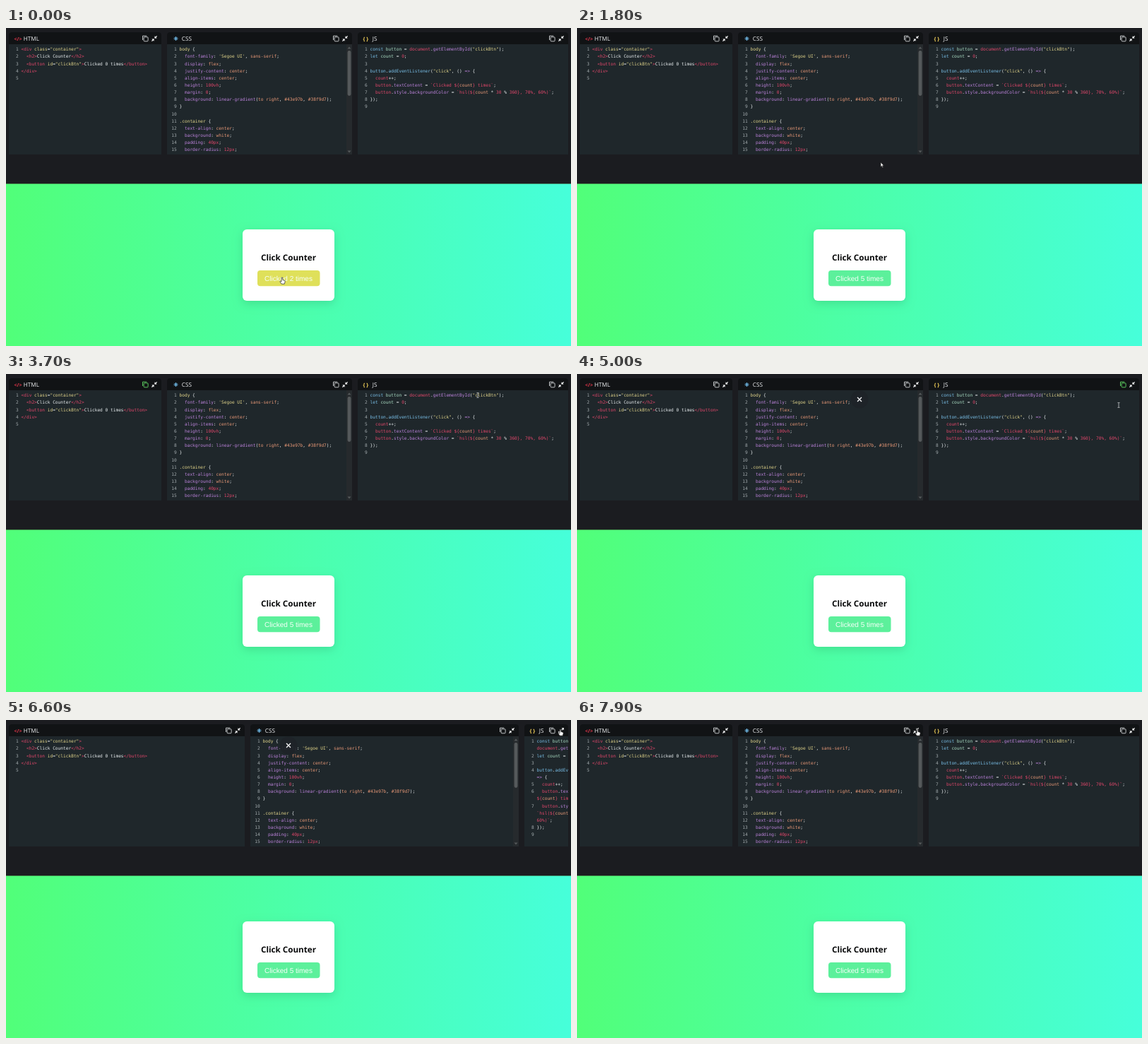
Animation, 800 px wide and 450 px high, one loop 8000 ms. Source, as an HTML page with a canvas:

```html
<!DOCTYPE html>
<html lang="en">
<head>
<meta charset="utf-8">
<title>Click Counter</title>
<style>
html, body { margin: 0; width: 100%; height: 100%; overflow: hidden; background: #1b1c20; }
canvas { display: block; }
</style>
</head>
<body>
<canvas id="stage" width="800" height="450"></canvas>
<script>
const ctx = document.getElementById('stage').getContext('2d');
const LOOP = 8000, CHAR = 3.72, ROW = 10.15, WRAP = 36;
const MONO = '6.18px "DejaVu Sans Mono", monospace';
const SANS = '"Open Sans", "Noto Sans", sans-serif';

// "~k" switches to colour k for the rest of the line.
const INK = {
  w: '#e9eef0', r: '#e2476b', y: '#e3d68b', o: '#eb9a78',
  p: '#bd83dc', b: '#79bfe8', g: '#a9dcc3'
};

const HTML = [
  '~r<div ~yclass~w=~y"container"~r>',
  '  ~r<h2>~wClick Counter~r</h2>',
  '  ~r<button ~yid~w=~y"clickBtn"~r>~wClicked 0 times~r</button>',
  '~r</div>',
  ''
];
const rule = (name, value) => `  ~p${name}~w: ${value}~w;`;
const CSS = [
  '~ybody ~w{',
  rule('font-family', "~y'Segoe UI'~w, ~osans-serif"),
  rule('display', '~oflex'),
  rule('justify-content', '~ocenter'),
  rule('align-items', '~ocenter'),
  rule('height', '~r100vh'),
  rule('margin', '~r0'),
  rule('background', '~plinear-gradient~w(~oto right~w, ~o#43e97b~w, ~o#38f9d7~w)'),
  '~w}',
  '',
  '~y.container ~w{',
  rule('text-align', '~ocenter'),
  rule('background', '~owhite'),
  rule('padding', '~r40px'),
  rule('border-radius', '~r12px')
];
const JS = [
  '~bconst ~gbutton ~w= ~rdocument~w.~pgetElementById~w(~y"clickBtn"~w);',
  '~blet ~gcount ~w= ~r0~w;',
  '',
  '~bbutton~w.~baddEventListener~w(~y"click"~w, () ~p=> ~w{',
  '  ~rcount~w++;',
  '  ~rbutton~w.~ptextContent ~w= ~r`Clicked ${~ocount~r} times`~w;',
  '  ~rbutton~w.~pstyle~w.~pbackgroundColor ~w= ~r`hsl(${~ocount ~w* ~r30 ~w% ~r360}, 70%, 60%)`~w;',
  '~w});',
  ''
];

// Turns marked-up text into a list of [character, colour].
function parse(line) {
  let ink = INK.w;
  const out = [];
  for (let i = 0; i < line.length; i++) {
    if (line[i] === '~') ink = INK[line[++i]];
    else out.push([line[i], ink]);
  }
  return out;
}

// Breaks a parsed line at spaces into rows of at most `max` characters.
function wrap(chars, max) {
  const rows = [];
  while (chars.length > max) {
    let cut = max;
    while (cut > 0 && chars[cut][0] !== ' ') cut--;
    if (cut === 0) break;
    rows.push(chars.slice(0, cut));
    chars = chars.slice(cut + 1);
  }
  return [...rows, chars];
}

const [htmlCode, cssCode, jsCode] = [HTML, CSS, JS].map(code => code.map(parse));

const ease = (t, from, to) => {
  const k = Math.min(1, Math.max(0, (t - from) / (to - from)));
  return k * k * (3 - 2 * k);
};
const mix = (a, b, k) => a + (b - a) * k;

function text(str, x, y, font, color, align = 'left') {
  ctx.font = font;
  ctx.fillStyle = color;
  ctx.textAlign = align;
  ctx.fillText(str, x, y);
}

function box(x, y, w, h, radius, color) {
  ctx.fillStyle = color;
  ctx.beginPath();
  ctx.roundRect(x, y, w, h, radius);
  ctx.fill();
}

function shape(points, x, y, fill, stroke) {
  ctx.beginPath();
  points.forEach(([dx, dy]) => ctx.lineTo(x + dx, y + dy));
  ctx.closePath();
  ctx.fillStyle = fill;
  ctx.fill();
  if (stroke) {
    ctx.strokeStyle = stroke;
    ctx.lineWidth = 0.7;
    ctx.stroke();
  }
}

function line(x1, y1, x2, y2, color, width) {
  ctx.strokeStyle = color;
  ctx.lineWidth = width;
  ctx.beginPath();
  ctx.moveTo(x1, y1);
  ctx.lineTo(x2, y2);
  ctx.stroke();
}

function copyIcon(x, y, copied) {
  ctx.strokeStyle = copied ? '#63d866' : '#d4d6d9';
  ctx.lineWidth = 0.9;
  ctx.beginPath();
  ctx.roundRect(x - 2.2, y - 2.2, 6, 6, 1);
  ctx.moveTo(x - 3.8, y + 2);
  ctx.lineTo(x - 3.8, y - 3.8);
  ctx.lineTo(x + 2, y - 3.8);
  ctx.stroke();
}

function resizeIcon(x, y, expand) {
  for (const s of [1, -1]) {
    const tip = expand ? 3.8 : 0.5, base = expand ? 0.6 : 3.7;
    shape([[tip * s, -tip * s], [tip * s, -base * s], [base * s, -tip * s]], x, y, '#f2f3f4');
    line(x + 0.8 * s, y - 0.8 * s, x + 3.6 * s, y - 3.6 * s, '#f2f3f4', 1.3);
  }
}

function star(x, y) {
  for (let i = 0; i < 4; i++) {
    const a = i * Math.PI / 4, c = Math.cos(a) * 3, s = Math.sin(a) * 3;
    line(x - c, y - s, x + c, y + s, '#6fb9e6', 1);
  }
}

function scrollbar(right) {
  ctx.fillStyle = '#262a2d';
  ctx.fillRect(right - 8, 23, 8, 156);
  box(right - 6.4, 32, 4.8, 64, 2.4, '#55595b');
  shape([[-2.5, 1.5], [0, -1.5], [2.5, 1.5]], right - 4, 28, '#55595b');
  shape([[-2.5, -1.5], [0, 1.5], [2.5, -1.5]], right - 4, 175, '#55595b');
}

function panel(name, code, left, right, copied, collapsed) {
  ctx.save();
  ctx.beginPath();
  ctx.roundRect(left, 6, right - left, 173, [4, 4, 0, 0]);
  ctx.clip();
  ctx.fillStyle = '#1f272b';
  ctx.fillRect(left, 6, right - left, 173);
  ctx.fillStyle = '#111315';
  ctx.fillRect(left, 6, right - left, 17);

  if (name === 'HTML') text('</>', left + 7.5, 17.8, '700 7px ' + SANS, '#e0364a');
  if (name === 'CSS') star(left + 12.5, 15);
  if (name === 'JS') text('{ }', left + 7.5, 17.6, '700 7.4px ' + SANS, '#f0cf59');
  text(name, left + 20.8, 18, '8.2px ' + SANS, '#eceef0');
  copyIcon(right - 22.7, 15, copied);
  resizeIcon(right - 10, 15, collapsed);

  let y = 32.2;
  code.forEach((chars, i) => {
    text(i + 1, left + 13.8, y, MONO, '#a3abae', 'right');
    for (const row of wrap(chars, right - left < 200 && name === 'JS' ? WRAP : 99)) {
      row.forEach(([c, ink], col) => {
        if (c !== ' ') text(c, left + 17.5 + col * CHAR, y, MONO, ink);
      });
      y += ROW;
    }
  });
  if (name === 'CSS') scrollbar(right);
  ctx.restore();
}

function preview(t) {
  const bg = ctx.createLinearGradient(0, 0, 800, 0);
  bg.addColorStop(0, '#51ff79');
  bg.addColorStop(1, '#46ffda');
  ctx.fillStyle = bg;
  ctx.fillRect(0, 220, 800, 230);
  ctx.fillStyle = '#37502d';
  ctx.fillRect(0, 220, 800, 0.6);

  ctx.save();
  ctx.shadowColor = 'rgba(0,0,0,.12)';
  ctx.shadowBlur = 13;
  ctx.shadowOffsetY = 4;
  box(335, 285, 130, 101, 6, '#fff');
  ctx.restore();

  text('Click Counter', 400, 329.4, '700 11.65px ' + SANS, '#08090a', 'center');
  const count = 2 + [200, 400, 600].filter(at => t >= at).length;
  const fill = ['#dfe05a', '#a8e85a', '#5ce85c', '#5cf09b'][count - 2];
  box(356, 343, 88.5, 22.3, 4, fill);
  text(`Clicked ${count} times`, 400, 357.8, '10.03px "Liberation Sans", Arial, sans-serif', '#f6fff8', 'center');
}

// Cursor hot spot: time, x, y.
const PATH = [
  [0, 391, 353], [700, 391, 353], [1100, 574.5, 324], [1500, 560, 290], [2100, 300, 90],
  [2500, 203, 20], [2700, 198, 14], [3100, 198, 14], [3700, 668, 30], [4050, 740, 3],
  [4400, 773, 14], [4700, 773, 15], [5000, 767, 44], [5300, 785, 13], [6950, 785, 13],
  [7600, 482, 13], [8000, 482, 13]
];

function cursorAt(t) {
  const i = PATH.findIndex(p => p[0] > t);
  const [t0, x0, y0] = PATH[i - 1], [t1, x1, y1] = PATH[i];
  const k = (t - t0) / (t1 - t0);
  return [mix(x0, x1, k), mix(y0, y1, k)];
}

function cursor(x, y, panels) {
  const inButton = x > 356 && x < 444 && y > 343 && y < 365;
  const inIcon = y > 9 && y < 19.5 && panels.some(([, r]) => x > r - 28 && x < r - 4);
  const inCode = y > 19 && y < 179 && panels.some(([l, r]) => x > l && x < r);
  if (inButton || inIcon) {
    shape([[-0.8, 0], [0.6, 0], [0.9, 3.6], [3.8, 4.4], [4.2, 6], [3.2, 9.2], [-0.8, 9.2],
      [-3.2, 5.8], [-2.5, 5], [-1, 6]], x, y, '#fff', '#222');
  } else if (inCode) {
    line(x, y - 3.3, x, y + 3.3, '#c9cdd0', 0.8);
    line(x - 1.6, y - 3.4, x + 1.6, y - 3.4, '#c9cdd0', 0.7);
    line(x - 1.6, y + 3.4, x + 1.6, y + 3.4, '#c9cdd0', 0.7);
  } else {
    shape([[0, 0], [0, 6.5], [1.5, 5.2], [2.5, 7.4], [3.5, 7], [2.5, 4.8], [4.4, 4.7]], x, y, '#fff', '#222');
  }
}

function closeButton(t) {
  const y = mix(-14, 36, ease(t, 4050, 4350));
  ctx.save();
  ctx.globalAlpha = 1 - ease(t, 7200, 7400);
  ctx.fillStyle = 'rgba(30,36,40,.93)';
  ctx.beginPath();
  ctx.arc(400, y, 12.5, 0, 7);
  ctx.fill();
  for (const s of [1, -1]) line(397, y - 3 * s, 403, y + 3 * s, '#fff', 1.2);
  ctx.restore();
}

function draw(t) {
  ctx.textRendering = 'geometricPrecision';
  ctx.fillStyle = '#1b1c20';
  ctx.fillRect(0, 0, 800, 450);

  const k = ease(t, 5400, 5700) - ease(t, 6950, 7200);
  const panels = [[4, mix(220, 338, k)], [mix(228, 346, k), mix(490, 726, k)], [mix(498, 734, k), 796]];
  panel('HTML', htmlCode, ...panels[0], t >= 2700 && t < 4700);
  panel('CSS', cssCode, ...panels[1]);
  panel('JS', jsCode, ...panels[2], t >= 4500 && t < 6500, k > 0.5);
  preview(t);
  closeButton(t);
  cursor(...cursorAt(t), panels);
}

function frame(now) {
  draw(Math.floor((now % LOOP) / 100) * 100);
  requestAnimationFrame(frame);
}
requestAnimationFrame(frame);
</script>
</body>
</html>
```
